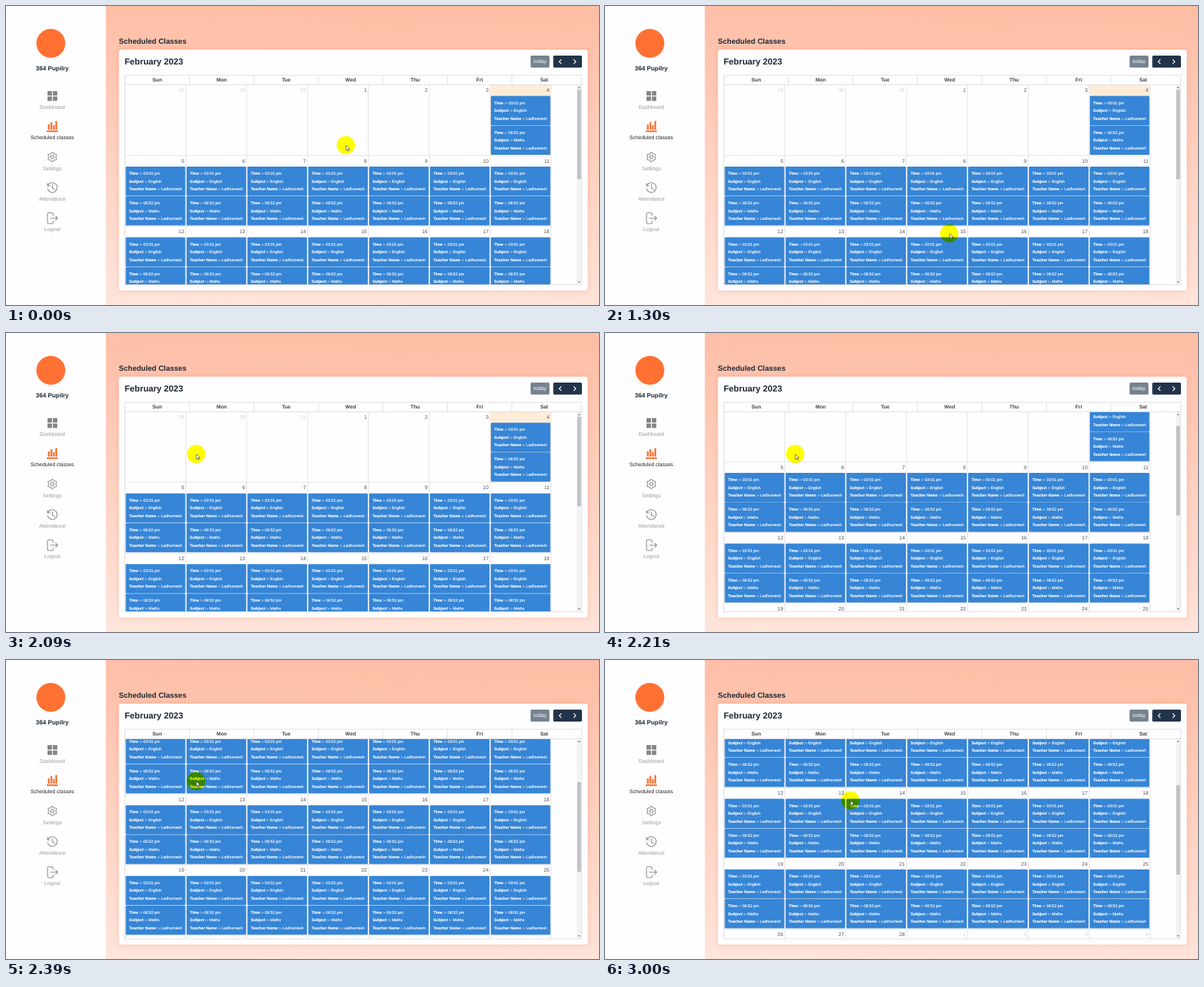
These frames come from a looping animation (800x404 px, 3.03 s). An HTML page:

```html
<!DOCTYPE html>
<html lang="en">
<head>
<meta charset="utf-8">
<title>Scheduled Classes</title>
<style>
  html, body { margin: 0; width: 100%; height: 100%; overflow: hidden; }
  svg { display: block; width: 800px; height: 404px; isolation: isolate;
        font-family: "Liberation Sans", Arial, sans-serif; text-rendering: geometricPrecision; }
  .b { font-weight: 700; }
  .mid { text-anchor: middle; }
  .end { text-anchor: end; }
  .lesson { fill: #fff; stroke: #fff; stroke-width: .14; font-size: 5.42px; }
  .line { fill: none; stroke: #dcdce0; stroke-width: .8; }
  .icon { fill: none; stroke: #8e8e90; stroke-width: 1.1; stroke-linecap: round; stroke-linejoin: round; }
  #card { filter: drop-shadow(0 0 3px rgba(225, 95, 50, .25)); }
  #spot { mix-blend-mode: multiply; }
</style>
</head>
<body>
<svg viewBox="0 0 800 404">
  <defs>
    <linearGradient id="bg" x1=".53" y1="0" x2=".47" y2="1">
      <stop offset="0" stop-color="#febda5"/>
      <stop offset="1" stop-color="#ffe4da"/>
    </linearGradient>
    <clipPath id="view"><rect x="160" y="106.5" width="610" height="270"/></clipPath>
  </defs>
  <rect width="800" height="404" fill="url(#bg)"/>
  <rect width="134.7" height="404" fill="#fefdff"/>

  <circle cx="60.5" cy="50.5" r="19.5" fill="#ff7033"/>
  <text class="b mid" x="62.5" y="87.2" font-size="8.3" fill="#1d2733">364 Pupilry</text>
  <g id="menu"></g>
  <path d="M56 115h6v6h-6zM63.2 115h6v6h-6zM56 122.2h6v6h-6zM63.2 122.2h6v6h-6z" fill="#858587"/>
  <path d="M55 168h15v2.2h-15zM56.5 160h2.6v7h-2.6zM60 157h2.4v10h-2.4zM63.3 161h2.4v6h-2.4zM66.5 155.500h2.600v11.500h-2.600z" fill="#f5783a"/>
  <g class="icon">
    <path id="gear"/><circle cx="62.5" cy="204" r="2.2"/>
    <path d="M56.5 242.5a6.6 6.6 0 1 1-.4 4.500M56 239.700v3.300h3.300M62.500 241.500v4.300l3 1.900"/>
    <path d="M63.5 283v-2a1.500 1.500 0 0 0-1.500-1.500h-4.500a1.500 1.500 0 0 0-1.500 1.500v11.500a1.500 1.500 0 0 0 1.500 1.500h4.500a1.500 1.500 0 0 0 1.500-1.500v-2M60 286.700h9.500M67 284l2.700 2.700l-2.700 2.700"/>
  </g>

  <text class="b" x="152.3" y="51" font-size="10" fill="#1d2733">Scheduled Classes</text>
  <rect id="card" x="152.3" y="59" width="632.5" height="325.5" rx="3.5" fill="#fefdff"/>
  <text class="b" x="160" y="79" font-size="11.65" fill="#1d2733">February 2023</text>
  <rect x="707.7" y="67" width="25.5" height="16.3" rx="1.7" fill="#76828f"/>
  <text class="mid" x="720.4" y="77.2" font-size="7.1" fill="#fff">today</text>
  <rect x="738.3" y="67" width="38.7" height="16.3" rx="1.7" fill="#22344a"/>
  <path d="M749.3 72.2l-2.9 3l2.9 3M765.8 72.2l2.9 3l-2.9 3" fill="none" stroke="#fff" stroke-width="1.2"/>

  <g id="head"></g>
  <g clip-path="url(#view)"><path id="cols" class="line"/><g id="rows"></g></g>
  <rect x="770" y="106.5" width="6.5" height="270" fill="#f2f2f3"/>
  <path d="M771.5 111l1.7-2l1.7 2zM771.5 372l1.7 2l1.7-2z" fill="#777"/>
  <rect id="thumb" x="770.7" y="113" width="5" height="121" fill="#c1c1c3"/>
  <path class="line" d="M160.3 93.5H776.7V376.7H160.3ZM160.3 106.5H776.7"/>

  <circle id="spot" r="12.3" fill="#ff0"/>
  <path id="arrow" d="M0 0V6.5L1.6 5.1L2.7 7.5L3.8 7L2.8 4.7H4.9Z" fill="#fff" stroke="#222" stroke-width=".6"/>
</svg>
<script>
const $ = id => document.getElementById(id);
const times = (n, f) => Array.from({ length: n }, (_, i) => f(i));
const LOOP = 3030, TOP = 106.5, LEFT = 160.5, COL = 82.1, ROW = 95.5;

const text = (s, x, y, size, fill, cls) =>
  `<text class="${cls}" x="${x}" y="${y}" font-size="${size}" fill="${fill}">${s}</text>`;

$("menu").innerHTML = ["Dashboard", "Scheduled classes", "Settings", "Attendance", "Logout"]
  .map((s, i) => text(s, 62.5, 139 + i * 41.3, 7.05, i == 1 ? "#222" : "#98989a", "mid")).join("");

$("gear").setAttribute("d", "M" + times(72, i => {
  const a = i * Math.PI / 36, r = 5.6 - .8 * Math.cos(6 * a);
  return `${62.5 + r * Math.cos(a)} ${204 + r * Math.sin(a)}`;
}).join("L") + "Z");

$("head").innerHTML = ["Sun", "Mon", "Tue", "Wed", "Thu", "Fri", "Sat"].map((s, i) =>
  text(s, 204 + i * 87, 102.4, 6.9, "#444", "b mid") +
  `<path class="line" d="M${LEFT + i * 87} 93.5V${TOP}"/>`).join("");

function lesson(x, y, time, subject) {
  const lines = Object.entries({ Time: time, Subject: subject, "Teacher Name": "Ladhumesh" });
  return `<rect x="${x + 1}" y="${y}" width="80.3" height="39.6" rx="1.2" fill="#3685d6"/>` +
    lines.map(([label, value], i) => `<text class="lesson" x="${x + 5.5}" y="${y + 11.2 + i * 10.4}">` +
      `<tspan class="b">${label} :-</tspan> ${value}</text>`).join("");
}

// Cell n counts from Sunday 29 January; lessons start on 4 February
function day(n) {
  const x = LEFT + n % 7 * COL, y = TOP + Math.floor(n / 7) * ROW;
  const date = new Date(2023, 0, 29 + n);
  return (n == 6 ? `<rect x="${x}" y="${y}" width="${COL}" height="${ROW}" fill="#fdecd8"/>` : "") +
    text(date.getDate(), x + 80, y + 9.8, 6.9, date.getMonth() == 1 ? "#555" : "#d0d0d3", "end") +
    (n < 6 ? "" : lesson(x, y + 15, "03:01 pm", "English") + lesson(x, y + 55, "06:52 pm", "Maths"));
}

$("rows").innerHTML = times(35, day).join("") +
  times(5, r => `<path class="line" d="M160 ${TOP + r * ROW}H735.5"/>`).join("");
$("cols").setAttribute("d", times(8, i => `M${LEFT + i * COL} ${TOP}V377`).join(""));

// Pointer path: time, x, y
const path = [
  [787, 458.5, 188], [877, 476.5, 252], [1180, 477, 254], [1390, 455, 347], [1693, 417, 199],
  [1783, 244, 172], [1996, 256.5, 163.5], [2602, 256.5, 163.5], [2995, 331, 189.5]
];

const clamp = v => Math.min(1, Math.max(0, v));
const smooth = v => v * v * (3 - 2 * v);

function pointer(t) {
  const i = Math.max(1, path.findIndex(p => p[0] >= t));
  const [t0, x0, y0] = path[i - 1], [t1, x1, y1] = path[i];
  const u = clamp((t - t0) / (t1 - t0));
  return [x0 + (x1 - x0) * u, y0 + (y1 - y0) * u];
}

function held(t) {
  const base = Math.floor((t - 88) / 303) * 303 + 88;
  return base + 90 * Math.min(2, Math.floor((t - base) / 90));
}

const move = (id, x, y) => $(id).setAttribute("transform", `translate(${x} ${y})`);
const start = performance.now();

function draw() {
  const t = held((performance.now() - start) % LOOP);
  const [x, y] = pointer(t);
  const scroll = 125 * smooth(clamp((t - 2064) / 374) ** 1.25);
  move("spot", x, y);
  move("arrow", x + .3, y + .5);
  move("rows", 0, -scroll);
  move("thumb", 0, scroll * .448);
  requestAnimationFrame(draw);
}
draw();
</script>
</body>
</html>
```
